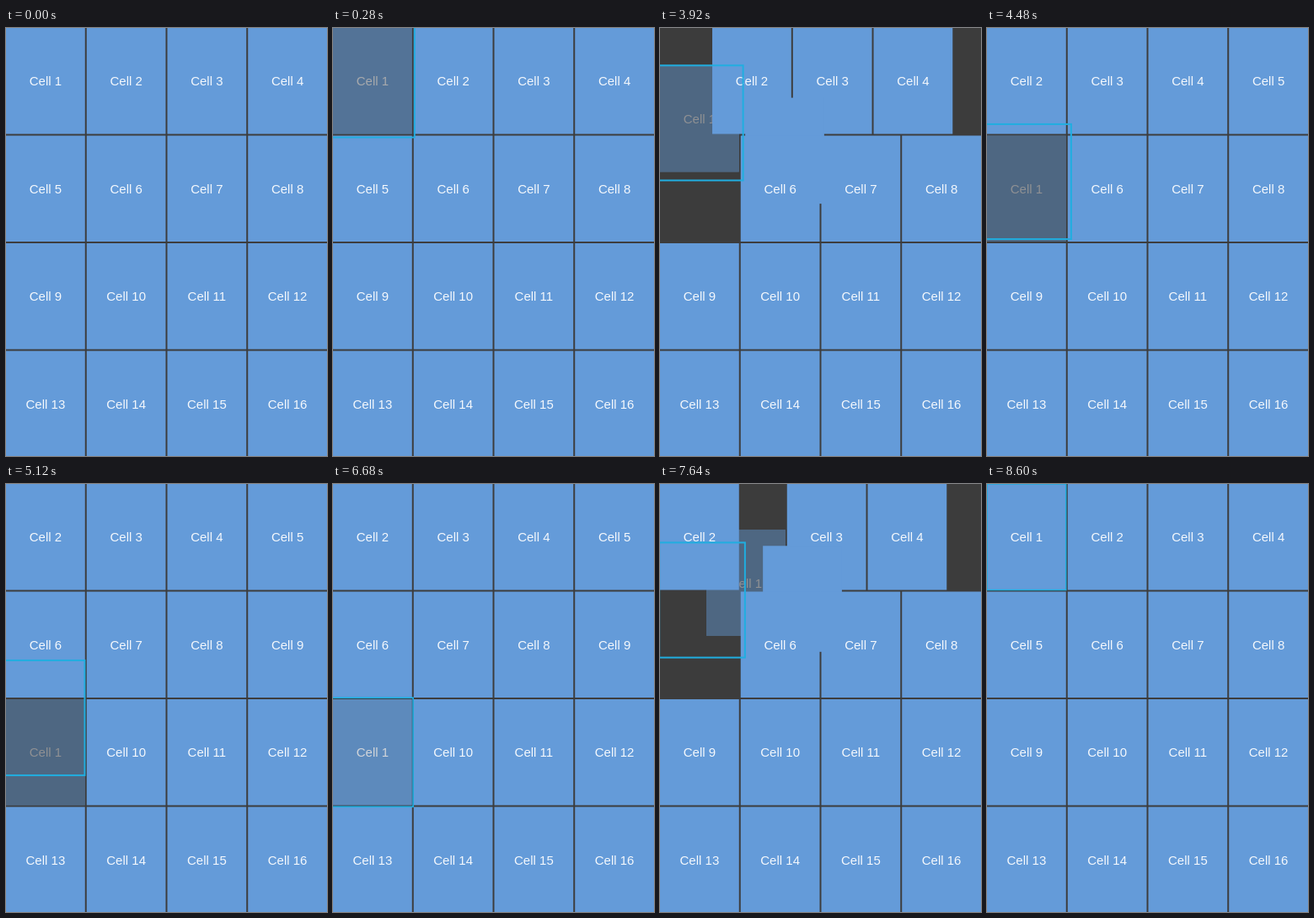
An HTML page with a canvas that plays this animation: 381x507 px, repeating every 9840 ms.

```html
<!DOCTYPE html>
<html>
<head>
<meta charset="utf-8">
<style>
  html, body { margin: 0; height: 100%; overflow: hidden; background: #3c3c3c; }
  canvas { display: block; }
</style>
</head>
<body>
<canvas id="stage" width="381" height="507"></canvas>
<script>
const LOOP = 9840, TICK = 40, PICK_UP = 280, SHUFFLE = 300;
const SCALE = 381 / 768; // the grid is laid out 768 units wide
const W = 189 * SCALE, H = 253 * SCALE, GAP = 4 * SCALE;
const BACK = '60, 60, 60';
const ctx = document.getElementById('stage').getContext('2d');

const ramp = (t, from, to) => Math.min(1, Math.max(0, (t - from) / (to - from)));
const smooth = u => u * u * (3 - 2 * u);

const corner = i => [i % 4 * (W + GAP), Math.floor(i / 4) * (H + GAP)];
const centre = i => [corner(i)[0] + W / 2, corner(i)[1] + H / 2];

// Strokes of the finger: start, end, where the outline's centre goes
const strokes = [
  [3520, 4480, [49, 182]],
  [4480, 5120, [42.6, 277]],
  [5400, 5680, [42.6, 313]],
  [6640, 6680, centre(8)],
  [6960, 7640, [50, 137.5]],
  [7640, 8040, [42, 83.5]],
  [8360, 8600, centre(0)]
];

// Reorders of cell 1: start, new index
const reorders = [[3800, 4], [4760, 8], [7160, 4], [7475, 1], [7660, 0]];

function outlineCentre(t) {
  let [x, y] = centre(0);
  for (const [start, end, [toX, toY]] of strokes) {
    const p = ramp(t, start, end);
    x += (toX - x) * p;
    y += (toY - y) * p;
  }
  return [x, y];
}

// 0 resting, 1 fully lifted; cell 1 is dropped and picked up again midway
function liftAt(t) {
  if (t < PICK_UP) return 0;
  if (t < 6680) return .76 + .24 * ramp(t, 3280, 3360);
  return ramp(t, 6600, 6840) - ramp(t, 8360, 8600);
}

// Index of cell n while cell 1 sits at index k
const indexOf = (n, k) => n === 1 ? k : n - 2 < k ? n - 2 : n - 1;

// Overlapping reorders add up
function cellCorner(n, t) {
  let [x, y] = corner(n - 1), last = 0;
  for (const [start, k] of reorders) {
    const p = smooth(ramp(t, start, start + SHUFFLE));
    const a = corner(indexOf(n, last)), b = corner(indexOf(n, k));
    x += (b[0] - a[0]) * p;
    y += (b[1] - a[1]) * p;
    last = k;
  }
  return [x, y];
}

function drawCell(n, t, dim) {
  const [x, y] = cellCorner(n, t);
  ctx.fillStyle = '#649bd9';
  ctx.fillRect(x, y, W, H);
  ctx.fillStyle = 'rgba(255, 255, 255, .93)';
  ctx.fillText('Cell ' + n, x + W / 2, y + H / 2 + 5.7);
  ctx.fillStyle = `rgba(${BACK}, ${dim})`;
  ctx.fillRect(x, y, W, H);
}

function drawOutline(t, lift) {
  const [x, y] = outlineCentre(t);
  const grow = 1 + .085 * lift, w = W * grow, h = H * grow;
  ctx.strokeStyle = '#20aee0';
  ctx.lineWidth = 1.5 + .5 * lift;
  ctx.strokeRect(x - w / 2, y - h / 2, w, h);
}

function draw(now) {
  const t = Math.floor(now % LOOP / TICK) * TICK;
  const lift = liftAt(t);
  ctx.fillStyle = `rgb(${BACK})`;
  ctx.fillRect(0, 0, 381, 507);
  ctx.font = '15px "Liberation Sans", Arial, sans-serif';
  ctx.textAlign = 'center';
  for (let n = 1; n <= 16; n++) drawCell(n, t, n === 1 ? .55 * lift : 0);
  if (t >= PICK_UP) drawOutline(t, lift);
  requestAnimationFrame(draw);
}
requestAnimationFrame(draw);
</script>
</body>
</html>
```
